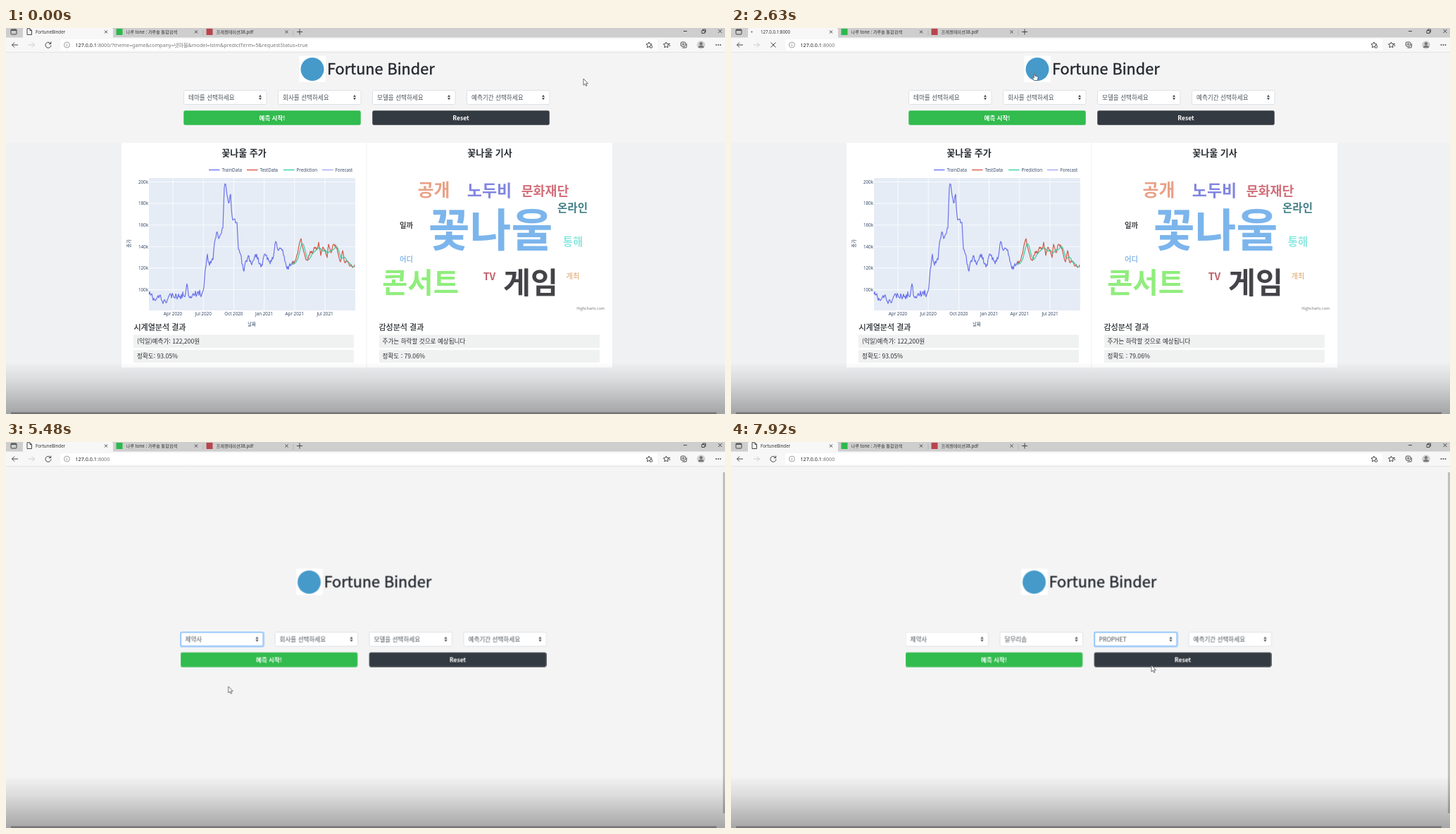
These frames come from a looping animation (1021 by 548 pixels, 7.99 s). An HTML page:

```html
<!DOCTYPE html>
<html lang="ko">
<head>
<meta charset="utf-8">
<title>Fortune Binder</title>
<style>
html, body { margin: 0; width: 100%; height: 100%; overflow: hidden; background: #f4f4f4; }
svg { display: block; width: 100%; height: 100%; }
text { font-family: "Noto Sans CJK KR", "Noto Sans CJK", "Noto Sans", sans-serif; white-space: pre; }
.ui, .ui text { font-family: "Noto Sans", "Noto Sans CJK KR", sans-serif; }
.tab { font-size: 6.2px; fill: #333; }
.url { font-size: 7.2px; fill: #777; }
.ico { fill: none; stroke: #444; stroke-width: 1; }
.field { font-size: 8.6px; fill: #495057; }
.btn { font-size: 8.5px; font-weight: 700; fill: #fff; text-anchor: middle; }
.h1 { font-size: 21.6px; font-weight: 500; fill: #23272e; stroke: #23272e; stroke-width: .4; }
.h2 { font-size: 13px; font-weight: 700; fill: #2b2f34; text-anchor: middle; }
.h3 { font-size: 11px; font-weight: 500; fill: #212529; stroke: #212529; stroke-width: .2; }
.row { font-size: 8.6px; fill: #2b2f33; }
.plot text { font-family: "Open Sans", "Noto Sans CJK KR", sans-serif; font-size: 6.3px; fill: #2a3f5f; }
.plot path { fill: none; stroke-linejoin: round; }
.word text { font-weight: 700; text-anchor: middle; }

.k { animation: 7.99s step-end infinite; }
.result { animation-name: result; }
.head { animation-name: head; }
.form { animation-name: form; }
.shift { animation-name: shift; }
.idle { animation-name: idle; }
.busy { animation-name: busy; }
.long { animation-name: long; }
.base { animation-name: base; }
.arrow { animation-name: arrow; }
.hand { animation-name: hand; }
.ring0 { animation-name: ring0; }
.ring1 { animation-name: ring1; }
.ring2 { animation-name: ring2; }
.old0 { animation-name: old0; }
.new0 { animation-name: new0; }
.old1 { animation-name: old1; }
.new1 { animation-name: new1; }
.old2 { animation-name: old2; }
.new2 { animation-name: new2; }
@keyframes result { 0% { opacity: 1 } 37.5%, 100% { opacity: 0 } }
@keyframes head { 0% { transform: none } 37.5%, 100% { transform: translateY(140.4px) } }
@keyframes form { 0% { transform: none } 37.5%, 100% { transform: translateY(181.5px) } }
@keyframes shift { 0% { transform: none } 66.3%, 100% { transform: translateX(-4.5px) } }
@keyframes idle { 0% { opacity: 1 } 30.3% { opacity: 0 } 37.9%, 100% { opacity: 1 } }
@keyframes busy { 0% { opacity: 0 } 30.3% { opacity: 1 } 37.9%, 100% { opacity: 0 } }
@keyframes long { 0% { opacity: 1 } 30.3%, 100% { opacity: 0 } }
@keyframes base { 0% { opacity: 0 } 30.3%, 100% { opacity: 1 } }
@keyframes arrow { 0% { opacity: 1 } 27.2% { opacity: 0 } 37.5%, 100% { opacity: 1 } }
@keyframes hand { 0% { opacity: 0 } 27.2% { opacity: 1 } 37.5%, 100% { opacity: 0 } }
@keyframes ring0 { 0% { opacity: 0 } 43.2% { opacity: 1 } 73.8%, 100% { opacity: 0 } }
@keyframes ring1 { 0% { opacity: 0 } 73.8% { opacity: 1 } 91%, 100% { opacity: 0 } }
@keyframes ring2 { 0% { opacity: 0 } 91%, 100% { opacity: 1 } }
@keyframes old0 { 0% { opacity: 1 } 66.3%, 100% { opacity: 0 } }
@keyframes new0 { 0% { opacity: 0 } 66.3%, 100% { opacity: 1 } }
@keyframes old1 { 0% { opacity: 1 } 84%, 100% { opacity: 0 } }
@keyframes new1 { 0% { opacity: 0 } 84%, 100% { opacity: 1 } }
@keyframes old2 { 0% { opacity: 1 } 97%, 100% { opacity: 0 } }
@keyframes new2 { 0% { opacity: 0 } 97%, 100% { opacity: 1 } }

.pointer { animation: pointer 7.99s ease-in-out infinite; }
@keyframes pointer {
  0% { transform: translate(820px, 72px) }
  11.2%, 14% { transform: translate(659px, 118px) }
  21.5% { transform: translate(322px, 112px) }
  28%, 37.5% { transform: translate(431px, 64px) }
  42.8%, 48% { transform: translate(334px, 279px) }
  52% { transform: translate(320px, 312px) }
  54.4% { transform: translate(312px, 328px) }
  56.4%, 58.2% { transform: translate(308px, 323px) }
  64.2%, 66.4% { transform: translate(290px, 362px) }
  73.8%, 77.3% { transform: translate(430px, 280px) }
  79.2% { transform: translate(426px, 309px) }
  81%, 84% { transform: translate(424px, 312px) }
  91%, 92.2% { transform: translate(570px, 284px) }
  94.9%, 96.6% { transform: translate(585px, 327px) }
  99.1%, 100% { transform: translate(597px, 317px) }
}
</style>
</head>
<body>
<svg viewBox="0 0 1021 548" preserveAspectRatio="none">
  <defs>
    <linearGradient id="shade" x2="0" y2="1">
      <stop offset="0" stop-opacity="0"/>
      <stop offset=".35" stop-opacity=".09"/>
      <stop offset="1" stop-opacity=".32"/>
    </linearGradient>
  </defs>

  <rect width="1021" height="548" fill="#f4f4f4"/>

  <g class="k result">
    <rect y="163" width="1021" height="385" fill="#eff1f3"/>
    <rect x="164" y="163" width="697" height="319" fill="#fff"/>
    <path d="M512 163V482" stroke="#f0f1f2"/>
    <text class="h2" x="338" y="181.5">꽃나울 주가</text>
    <text class="h2" x="687" y="181.5">꽃나울 기사</text>
    <g class="plot" id="plot">
      <rect x="203" y="213" width="293" height="188" fill="#e5ecf6"/>
      <text x="349" y="423" text-anchor="middle">날짜</text>
      <text transform="translate(176.5 306) rotate(-90)" text-anchor="middle">종가</text>
    </g>
    <g class="word" id="words"></g>
    <text x="850" y="400" font-size="5.4" fill="#777" text-anchor="end">Highcharts.com</text>
    <text class="h3" x="181.5" y="429">시계열분석 결과</text>
    <text class="h3" x="529.5" y="429">감성분석 결과</text>
    <g fill="#f0f1f1">
      <rect x="181" y="435.5" width="313" height="18.5"/>
      <rect x="181" y="457" width="313" height="18"/>
      <rect x="530" y="435.5" width="313" height="18.5"/>
      <rect x="530" y="457" width="313" height="18"/>
    </g>
    <g class="row">
      <text x="186" y="448">(익일)예측가: 122,200원</text>
      <text x="186" y="469">정확도: 93.05%</text>
      <text x="534.5" y="448">주가는 하락할 것으로 예상됩니다</text>
      <text x="534.5" y="469">정확도 : 79.06%</text>
    </g>
  </g>

  <g class="k shift">
    <g class="k head">
      <rect x="416.5" y="39.5" width="37.5" height="37.5" fill="#fff"/>
      <circle cx="435" cy="58.5" r="16.5" fill="#459aca"/>
      <text class="h1" x="456" y="66">Fortune Binder</text>
    </g>
    <g class="k form" id="form">
      <g stroke-opacity=".5">
        <rect x="252.5" y="117.5" width="251" height="20" rx="2" fill="#32bb4e" stroke="#32bb4e"/>
        <rect x="520.5" y="117.5" width="251" height="20" rx="2" fill="#343a42" stroke="#343a42"/>
      </g>
      <text class="btn" x="378" y="131">예측 시작!</text>
      <text class="btn" x="646" y="131">Reset</text>
    </g>
  </g>

  <rect class="k new0" x="1018" y="43" width="3" height="484" fill="#bfbfbf"/>

  <g class="ui">
    <rect width="1021" height="14" fill="#cecece"/>
    <rect y="13.5" width="1021" height="21" fill="#f7f7f7"/>
    <path d="M0 34.5H1021" stroke="#e4e4e4"/>
    <rect x="77" y="16" width="848" height="16" rx="3" fill="#fff"/>
    <path d="M24 14V2q0-2 2-2H150q2 0 2 2V14Z" fill="#f7f7f7"/>
    <path d="M280 3V11M408 3V11" stroke="#b5b5b5"/>

    <rect class="ico" x="7" y="2" width="8" height="7" rx="1"/>
    <path d="M7 3H15" stroke="#444" stroke-width="1.6"/>
    <path class="ico k idle" d="M30 .8H34L36.5 3.3V9.5H30ZM34 1V3.5H36.5"/>
    <circle class="k busy" cx="29.5" cy="5.5" r="1" fill="#555"/>
    <text class="tab k idle" x="42" y="7.8">FortuneBinder</text>
    <text class="tab k busy" x="42" y="7.8">127.0.0.1:8000</text>
    <rect x="156.5" y="1" width="9" height="9" fill="#2db84d"/>
    <text class="tab" x="170.5" y="7.8">나루 tone : 가루솔 통합검색</text>
    <rect x="284.5" y="1" width="9" height="9" fill="#b8454d"/>
    <text class="tab" x="298.5" y="7.8">프레젠테이션38.pdf</text>
    <path class="ico" d="M140 3.5l4 4m0-4l-4 4M268 3.5l4 4m0-4l-4 4M396.5 3.5l4 4m0-4l-4 4M413 5.5h8m-4-4v8"/>
    <path class="ico" d="M962 4.500h5M988 3.500h4v4h-4zM989.500 3.500V2h4v4h-1.500M1011.500 2l5 5m0-5l-5 5"/>

    <path class="ico" d="M17 24H8.5M12 20.5L8.5 24L12 27.5"/>
    <path class="ico" d="M32 24H40.5M37 20.5L40.5 24L37 27.5" style="stroke:#ccc"/>
    <path class="ico k idle" d="M63.3 22A4 4 0 1 0 64 24.5M63.8 19.5V22.5H60.8"/>
    <path class="ico k busy" d="M56.5 20.5l7 7m0-7l-7 7"/>
    <circle class="ico" cx="86.5" cy="24" r="4" style="stroke:#888;stroke-width:.8"/>
    <path d="M86.5 23.3V26.3M86.5 21.5V22.4" stroke="#888" stroke-width=".8"/>
    <text class="url k long" x="98.5" y="26.6"><tspan fill="#222">127.0.0.1</tspan>:8000/?theme=game&amp;company=넷마블&amp;model=lstm&amp;predictTerm=5&amp;requestStatus=true</text>
    <text class="url k base" x="98.5" y="26.6"><tspan fill="#222">127.0.0.1</tspan>:8000</text>
    <g class="ico">
      <path id="star" d="M913 20l1.2 2.5l2.8.4l-2 2l.4 2.8l-2.4-1.2l-2.5 1.2l.5-2.8l-2-2l2.8-.4z"/>
      <circle cx="916" cy="26.5" r="1.8" fill="#fff"/>
      <use href="#star" x="24.5"/>
      <path d="M940 22.5h3M941 25h2.5"/>
      <rect x="958.5" y="20" width="6" height="6" rx="1"/>
      <path d="M960.5 28H965q1.5 0 1.5-1.5V22M961.5 21.5v3m-1.5-1.5h3"/>
    </g>
    <circle cx="987" cy="24" r="5.8" fill="#cfcfcf"/>
    <circle cx="987" cy="22.2" r="2.2" fill="#777"/>
    <path d="M983 28q0-3.3 4-3.3t4 3.3z" fill="#777"/>
    <g fill="#444">
      <circle cx="1008.5" cy="24" r=".9"/><circle cx="1011.5" cy="24" r=".9"/><circle cx="1014.5" cy="24" r=".9"/>
    </g>
  </g>

  <rect y="474" width="1021" height="74" fill="url(#shade)"/>
  <rect x="7" y="545.5" width="1002" height="2.5" fill="#757575"/>

  <g class="pointer">
    <path class="k arrow" d="M0 0V9.2L2.1 7.3L3.6 10.4L5 9.7L3.6 6.7H6.4Z" fill="#fff" stroke="#4a4a55" stroke-width=".8"/>
    <path class="k hand" d="M-.8 .8Q0-.3 .8.8V4L4.2 4.8Q5.3 5.2 5 6.5L4.2 10.5H-.6L-3.3 6.7Q-3 5.5-1.8 6.3L-.8 7.2Z" fill="#fff" stroke="#4a4a55" stroke-width=".8"/>
  </g>
</svg>
<script>
const NS = "http://www.w3.org/2000/svg";
const $ = id => document.getElementById(id);

function add(parent, tag, attrs, text) {
  const el = document.createElementNS(NS, tag);
  for (const key in attrs) el.setAttribute(key, attrs[key]);
  if (text) el.textContent = text;
  parent.append(el);
  return el;
}

// Select boxes: placeholder and the value chosen later
const form = $("form");
[["테마를 선택하세요", "제약사"], ["회사를 선택하세요", "달무리솜"],
 ["모델을 선택하세요", "PROPHET"], ["예측기간 선택하세요"]].forEach(([hint, value], i) => {
  const x = 252 + 134 * i;
  const box = { x: x + .5, y: 88.5, width: 117.5, height: 20, rx: 2 };
  add(form, "rect", { ...box, fill: "#fff", stroke: "#dde1e5" });
  if (value) {
    const ring = add(form, "g", { class: "k ring" + i, fill: "none", stroke: "#80bdff" });
    add(ring, "rect", { ...box, "stroke-width": 3, "stroke-opacity": .35 });
    add(ring, "rect", { ...box, "stroke-width": 1.2 });
    add(form, "text", { class: "field k new" + i, x: x + 7, y: 102 }, value);
  }
  add(form, "text", { class: "field" + (value ? " k old" + i : ""), x: x + 7, y: 102 }, hint);
  add(form, "path", { d: `M${x + 107} 97.8l2-2.8l2 2.8zM${x + 107} 99.2l2 2.8l2-2.8z`, fill: "#343a40" });
});

// Word cloud: text, centre x, centre y, size, colour
[["공개", 607.5, 230, 25, "#e9a187"], ["노두비", 686.5, 230, 23, "#8085e0"],
 ["문화재단", 765.5, 231, 18.4, "#d2707b"], ["온라인", 804.5, 255.5, 15.6, "#438088"],
 ["일까", 568.5, 280, 10.3, "#434348"], ["꽃나울", 688, 286, 64, "#7cb5ec"],
 ["통해", 805, 303.5, 15.4, "#91e8e1"], ["어디", 568.5, 328, 10.3, "#8bbcec"],
 ["콘서트", 588.5, 361, 39.5, "#90ed7d"], ["TV", 686.5, 352.5, 14, "#c06068"],
 ["게임", 745, 361, 42.3, "#434348"], ["개최", 805, 352, 10.3, "#e6bf97"]
].forEach(([word, x, y, size, fill]) =>
  add($("words"), "text", { x, y: y + size * .37, "font-size": size, fill }, word));

// Price chart
const plot = $("plot");
for (let k = 100; k <= 200; k += 20) {
  const y = 218.5 + (200 - k) * 1.53;
  add(plot, "path", { d: `M203 ${y}H496`, stroke: "#fff", "stroke-width": .8 });
  add(plot, "text", { x: 202, y: y + 2.3, "text-anchor": "end" }, k + "k");
}
["Apr 2020", "Jul 2020", "Oct 2020", "Jan 2021", "Apr 2021", "Jul 2021"].forEach((label, i) => {
  const x = 237 + 43.2 * i;
  add(plot, "path", { d: `M${x} 213V401`, stroke: "#fff", "stroke-width": .8 });
  add(plot, "text", { x, y: 408.3, "text-anchor": "middle" }, label);
});
[["TrainData", 288, "#636efa"], ["TestData", 342, "#d9543f"],
 ["Prediction", 394, "#2fd09f"], ["Forecast", 449, "#a5a0f5"]].forEach(([label, x, stroke]) => {
  add(plot, "path", { d: `M${x} 201.5h15.5`, stroke, "stroke-width": 1.3 });
  add(plot, "text", { x: x + 18.5, y: 203.8 }, label);
});

let seed = 11;
const rand = () => (seed = seed * 16807 % 2147483647) / 2147483647;

// Walk between key points one pixel at a time, with a little noise
function walk(points, noise) {
  const out = [];
  for (let i = 0; i + 3 < points.length; i += 2) {
    const [x0, y0, x1, y1] = points.slice(i, i + 4);
    for (let x = x0; x < x1; x++) {
      const jitter = x > x0 ? (rand() - .5) * noise : 0;
      out.push([x, y0 + (y1 - y0) * (x - x0) / (x1 - x0) + jitter]);
    }
  }
  return out;
}
const draw = (pts, stroke) => add(plot, "path", {
  d: "M" + pts.map(p => p[0] + " " + p[1].toFixed(1)).join("L"), stroke, "stroke-width": 1.2
});

const train = walk([203, 378, 208, 382, 212, 387, 218, 380, 222, 388, 227, 390, 232, 379, 238, 382,
  247, 381, 255, 377, 257, 363, 259, 379, 268, 379, 272, 375, 278, 378, 281, 368, 283, 342, 286, 321,
  288, 333, 294, 329, 297, 300, 299, 290, 302, 299, 306, 291, 308, 284, 310, 226, 312, 222, 314, 238,
  317, 248, 319, 236, 321, 267, 328, 276, 330, 314, 333, 321, 338, 345, 341, 330, 344, 323, 348, 334,
  352, 329, 356, 321, 360, 335, 364, 337, 368, 321, 374, 331, 379, 328, 383, 303, 386, 315, 391, 313,
  395, 324, 399, 342, 405, 336, 410, 331], 9);
const test = walk([406, 335, 410, 331, 414, 321, 417, 305, 419, 299, 422, 314, 426, 329, 429, 329,
  432, 317, 435, 320, 438, 311, 441, 315, 444, 304, 447, 323, 450, 311, 453, 315, 456, 326, 458, 307,
  462, 319, 465, 307, 468, 308, 471, 318, 475, 332, 478, 316, 481, 333, 485, 331, 489, 338, 496, 338], 5);

// The prediction trails the real prices
const trail = test.map((p, i) => {
  const part = test.slice(Math.max(0, i - 5), i + 1);
  return [p[0], part.reduce((sum, q) => sum + q[1], 0) / part.length + 1];
});
draw(train, "#6a72ea");
draw(test, "#cf5a48");
draw(trail, "#43c99f");
</script>
</body>
</html>
```
